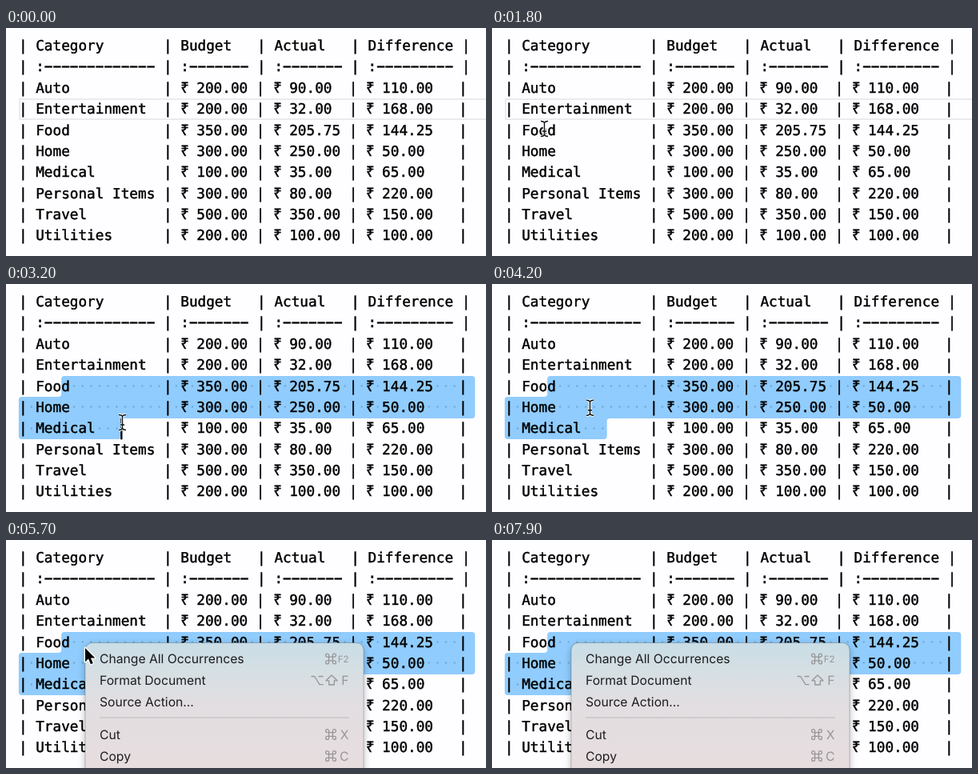
Write an HTML page with a canvas that moves like this. It is 600 px wide and 285 px high and loops after 8 s.

```html
<!DOCTYPE html>
<html lang="en">
<head>
<meta charset="utf-8">
<title>Budget table</title>
<style>
html, body { margin: 0; width: 100%; height: 100%; overflow: hidden; background: #fefdff; }
canvas { display: block; width: 100vw; height: 100vh; }
</style>
</head>
<body>
<canvas id="stage"></canvas>
<script>
const W = 600, H = 285, LOOP = 8000;
const LEFT = 15.9, CHAR = 10.65, RUPEE = 9.4, TOP = 9.7, LINE = 26.35;
const MONO = '17.69px "DejaVu Sans Mono", monospace';
const RUPEE_FONT = '18.5px "Noto Sans", sans-serif';
const UI = '"Inter", sans-serif';
const CLICK = 1900, DRAG_END = 3300, MENU = 5500;

const canvas = document.getElementById('stage');
const ctx = canvas.getContext('2d');

// Table text
const widths = [14, 8, 8, 10];
const makeRow = cells => '| ' + cells.map((c, i) => c.padEnd(widths[i])).join(' | ') + ' |';
const rows = [
  makeRow(['Category', 'Budget', 'Actual', 'Difference']),
  makeRow(widths.map(n => ':' + '\u2212'.repeat(n - 1))),
  ...[
    ['Auto', 200, 90],
    ['Entertainment', 200, 32],
    ['Food', 350, 205.75],
    ['Home', 300, 250],
    ['Medical', 100, 35],
    ['Personal Items', 300, 80],
    ['Travel', 500, 350],
    ['Utilities', 200, 100]
  ].map(([name, budget, actual]) =>
    makeRow([name, ...[budget, actual, budget - actual].map(n => '₹ ' + n.toFixed(2))]))
];

// Pointer path: time, x, y
const path = [
  [500, 372, 229], [800, 235, 188], [1100, 57, 150], [1300, 79, 142],
  [1600, 69, 126.5], [1700, 69, 126.5], [1800, 65.5, 126], [1900, 68, 127],
  [2300, 70, 128], [2700, 86, 142], [3000, 122, 161], [3200, 145.5, 173],
  [3800, 145.5, 173], [4600, 99.5, 136.5], [5900, 99.5, 136.5], [6250, 102, 312]
];

function pointerAt(t) {
  if (t < path[0][0]) return null;
  for (let i = 1; i < path.length; i++) {
    const [t0, x0, y0] = path[i - 1], [t1, x1, y1] = path[i];
    if (t <= t1) {
      const k = (t - t0) / (t1 - t0);
      return { x: x0 + (x1 - x0) * k, y: y0 + (y1 - y0) * k };
    }
  }
  return null;
}

const rowTop = r => Math.round(TOP + r * LINE);

function colX(r, col) {
  const rupees = rows[r].slice(0, col).split('₹').length - 1;
  return LEFT + col * CHAR - rupees * (CHAR - RUPEE);
}

function caretAt(p) {
  const row = Math.floor((p.y - 2 - TOP) / LINE);
  const col = Math.floor((p.x - LEFT) / CHAR + 0.35);
  return { row, col: Math.min(Math.max(col, 0), rows[row].length) };
}

function box(x, y, w, h, radii, color) {
  ctx.fillStyle = color;
  ctx.beginPath();
  ctx.roundRect(x, y, w, h, radii);
  ctx.fill();
}

// Concave corner at (x, y), opening along dx, dy
function fillet(x, y, dx, dy, r = 4) {
  ctx.beginPath();
  ctx.moveTo(x, y);
  ctx.lineTo(x + dx * r, y);
  ctx.quadraticCurveTo(x, y, x, y + dy * r);
  ctx.fill();
}

function drawSelection(a, b) {
  const color = '#90ccfd', spans = [];
  for (let r = a.row; r <= b.row; r++) {
    const from = r === a.row ? a.col : 0;
    const to = r === b.row ? b.col : rows[r].length;
    spans.push({ r, from, to, x0: colX(r, from), x1: colX(r, to) + (r < b.row ? 9.7 : 0) });
  }
  spans.forEach((s, i) => {
    const prev = spans[i - 1], next = spans[i + 1];
    const y0 = rowTop(s.r), y1 = rowTop(s.r + 1);
    const radii = [
      !prev || prev.x0 > s.x0, !prev || prev.x1 < s.x1,
      !next || next.x1 < s.x1, !next || next.x0 > s.x0
    ].map(on => on ? 4 : 0);
    box(s.x0, y0, s.x1 - s.x0, y1 - y0, radii, color);
    if (next && next.x0 < s.x0 && next.x1 > s.x0) fillet(s.x0, y1, -1, -1);
    if (next && next.x1 < s.x1 && next.x1 > s.x0) fillet(next.x1, y1, 1, 1);
  });
  // Whitespace marks
  ctx.fillStyle = '#6facd9';
  for (const s of spans) {
    for (let c = s.from; c < s.to; c++) {
      if (rows[s.r][c] !== ' ') continue;
      ctx.beginPath();
      ctx.arc(colX(s.r, c) + CHAR / 2, rowTop(s.r) + LINE / 2 - 0.7, 1.2, 0, 7);
      ctx.fill();
    }
  }
}

function drawMatches(a, b) {
  if (a.row !== b.row) return;
  const word = rows[a.row].slice(a.col, b.col).toLowerCase();
  if (!/^[a-z]+$/.test(word)) return;
  rows.forEach((row, r) => {
    const text = row.toLowerCase();
    for (let c = text.indexOf(word); c >= 0; c = text.indexOf(word, c + 1)) {
      if (r === a.row && c === a.col) continue;
      const x = colX(r, c);
      box(x, rowTop(r), colX(r, c + word.length) - x, LINE, 0, '#cfe8fc');
    }
  });
}

function drawLineMark(r) {
  ctx.strokeStyle = '#ebeaec';
  ctx.lineWidth = 2;
  ctx.strokeRect(17, rowTop(r), W, LINE - 1.35);
}

function drawCaret(pos) {
  ctx.fillStyle = '#000';
  ctx.fillRect(colX(pos.row, pos.col) - 0.5, rowTop(pos.row), 2.3, LINE);
}

function drawTable() {
  ctx.fillStyle = ctx.strokeStyle = '#000';
  ctx.lineWidth = 0.45;
  ctx.lineJoin = 'round';
  rows.forEach((row, r) => {
    const y = TOP + r * LINE + 18.4;
    [...row].forEach((ch, c) => {
      if (ch === ' ') return;
      ctx.font = ch === '₹' ? RUPEE_FONT : MONO;
      ctx.fillText(ch, colX(r, c), y);
      ctx.strokeText(ch, colX(r, c), y);
    });
  });
}

// Menu
const GREY = '#989597';
const icons = {
  option: new Path2D('M-7.5 -5h4.2l6.2 10.2h4.6M1.5 -5h6'),
  shift: new Path2D('M0 -6.5L7 0.3H3.3V5.5H-3.3V0.3H-7Z')
};

function icon(name, x, y) {
  ctx.save();
  ctx.translate(x, y);
  ctx.strokeStyle = GREY;
  ctx.lineWidth = 1.3;
  if (icons[name]) ctx.stroke(icons[name]);
  else for (let i = 0; i < 4; i++) {
    ctx.beginPath();
    ctx.moveTo(2.4, -4.4);
    ctx.lineTo(2.4, 4.4);
    ctx.moveTo(4.4, 2.4);
    ctx.arc(4.4, 4.4, 2, 1.5 * Math.PI, 3 * Math.PI);
    ctx.stroke();
    ctx.rotate(Math.PI / 2);
  }
  ctx.restore();
}

function label(text, x, y, size, color, align = 'left') {
  ctx.font = `${size}px ${UI}`;
  ctx.fillStyle = color;
  ctx.textAlign = align;
  ctx.fillText(text, x, y);
  ctx.textAlign = 'left';
}

const items = [
  { y: 148.5, text: 'Change All Occurrences', key: 'F2', size: 11.5, marks: [['command', 406]] },
  { y: 175.5, text: 'Format Document', key: 'F', marks: [['option', 389], ['shift', 407]] },
  { y: 202.5, text: 'Source Action...' },
  { y: 243, text: 'Cut', key: 'X', marks: [['command', 406]] },
  { y: 270, text: 'Copy', key: 'C', marks: [['command', 406]] }
];

function drawMenu() {
  const x = 99, y = 128.5, w = 348, h = 190;
  const fill = ctx.createLinearGradient(0, y, 0, H);
  fill.addColorStop(0, '#c9dde6');
  fill.addColorStop(0.22, '#d5dfe4');
  fill.addColorStop(0.48, '#e2dee1');
  fill.addColorStop(1, '#e7dddf');
  ctx.save();
  ctx.shadowColor = 'rgba(0,0,0,.28)';
  ctx.shadowBlur = 10;
  ctx.shadowOffsetY = 3;
  box(x, y, w, h, 9, fill);
  ctx.restore();
  ctx.strokeStyle = 'rgba(0,0,0,.2)';
  ctx.lineWidth = 1;
  ctx.stroke();

  ctx.fillStyle = '#cbc4c7';
  ctx.fillRect(117, 221.3, 312, 1.5);
  for (const { y, text, key, size = 15.7, marks = [] } of items) {
    label(text, 117, y + 5.6, 15.7, '#1d1c1e');
    if (key) label(key, 428.5, y + (size < 15 ? 4.9 : 5.6), size, GREY, 'right');
    marks.forEach(([name, mx]) => icon(name, mx, y));
  }
}

// Pointers
const beam = new Path2D('M-4.5 -9.5Q-0.5 -9.5 0 -7Q0.5 -9.5 4.5 -9.5M0 -7V7M-4.5 9.5Q-0.5 9.5 0 7Q0.5 9.5 4.5 9.5M-2.5 3H2.5');
const arrow = new Path2D('M0 0V17.2L4 13.5L6.9 20.2L9.8 18.9L6.9 12.4H12.3Z');

function drawPointer(p, isArrow) {
  ctx.save();
  ctx.lineJoin = 'round';
  ctx.strokeStyle = '#fff';
  if (isArrow) {
    ctx.translate(p.x - 0.5, p.y - 1.5);
    ctx.lineWidth = 2.6;
    ctx.stroke(arrow);
    ctx.fillStyle = '#000';
    ctx.fill(arrow);
  } else {
    ctx.translate(p.x, p.y);
    ctx.lineWidth = 3.4;
    ctx.stroke(beam);
    ctx.strokeStyle = '#111';
    ctx.lineWidth = 1.4;
    ctx.stroke(beam);
  }
  ctx.restore();
}

function draw(t) {
  ctx.fillStyle = '#fefdff';
  ctx.fillRect(0, 0, W, H);

  const start = { row: 4, col: 5 };
  let end = null;
  if (t < CLICK) drawLineMark(3);
  else {
    end = caretAt(pointerAt(Math.min(t, DRAG_END)));
    if (end.row === start.row && end.col === start.col) drawLineMark(start.row);
    else {
      drawMatches(start, end);
      drawSelection(start, end);
    }
  }
  drawTable();

  const blinkOn = t < 3400 || Math.floor((t - 3400) / 500) % 2 === 0;
  if (end && blinkOn && t < MENU) drawCaret(end);
  if (t >= MENU) drawMenu();
  const p = pointerAt(t);
  if (p) drawPointer(p, t >= MENU);
}

function frame(now) {
  const dpr = window.devicePixelRatio || 1;
  const w = Math.round(innerWidth * dpr), h = Math.round(innerHeight * dpr);
  if (canvas.width !== w || canvas.height !== h) {
    canvas.width = w;
    canvas.height = h;
  }
  ctx.setTransform(w / W, 0, 0, h / H, 0, 0);
  ctx.textRendering = 'geometricPrecision';
  draw(Math.floor(now % LOOP / 100) * 100);
  requestAnimationFrame(frame);
}
requestAnimationFrame(frame);
</script>
</body>
</html>
```
